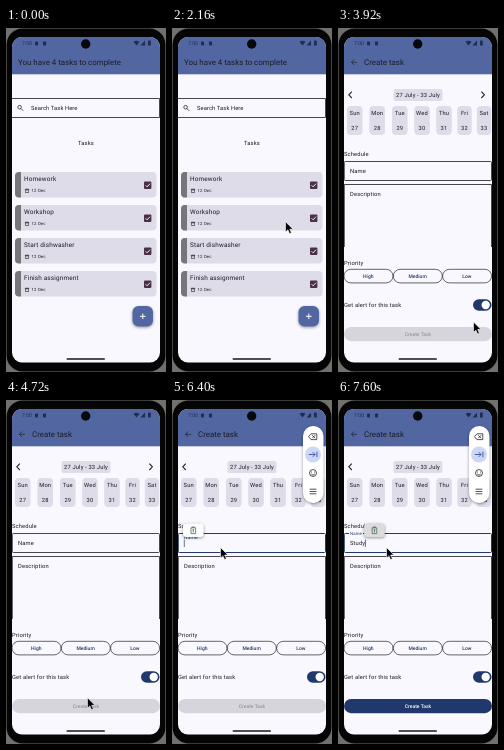
An HTML page that plays this animation: 160x344 px, repeating every 8 s.

```html
<!DOCTYPE html>
<html lang="en">
<head>
<meta charset="utf-8">
<title>Task planner</title>
<style>
  html, body { margin: 0; width: 100%; height: 100%; overflow: hidden; background: #70706c; }
  svg { display: block; width: 160px; height: 344px; }
  text { font-family: Roboto, Arial, sans-serif; fill: #1c1b20; text-rendering: geometricPrecision; }
  .line { fill: none; stroke: #1c1b20; stroke-width: .8; }
  .icon { fill: none; stroke: #26262c; stroke-width: .8; }
  .shadow { filter: drop-shadow(0 1px 1.5px #0006); }
</style>
</head>
<body>
<svg id="stage" viewBox="0 0 160 344"></svg>
<script>
const NAVY = '#20386c', BLUE = '#5267a2', CHIP = '#dddce8';

const text = (x, y, s, size = 5.75, attrs = '') =>
  `<text x="${x}" y="${y}" font-size="${size}" ${attrs}>${s}</text>`;
const mid = 'text-anchor="middle" ';
const spaced = 'letter-spacing=".16"';
const rect = (x, y, w, h, r, fill, attrs = '') =>
  `<rect x="${x}" y="${y}" width="${w}" height="${h}" rx="${r}" fill="${fill}" ${attrs}/>`;
const path = (d, attrs = 'class="icon"') => `<path d="${d}" ${attrs}/>`;

const statusBar = text(16, 17.3, '7:00', 5.2, 'style="fill:#222b50"') +
  rect(29, 13.5, 3, 4, 1, '#222b50') + rect(37, 13.5, 3, 4, .8, '#222b50') +
  path('M127.5 13.8Q130.5 11.6 133.5 13.8L130.5 17.6ZM139 12.5V17.5H134.5Z', 'fill="#222b50"') +
  rect(142, 12.5, 2.8, 5, .6, '#222b50') +
  '<circle cx="79.7" cy="16" r="4.7" fill="#07080b"/>';

const card = (title, i) => {
  const y = 144 + i * 33;
  return `<g transform="translate(0 ${y})">` +
    rect(9, 0, 141.5, 25.5, 4, CHIP) +
    path('M15 0H13A4 4 0 0 0 9 4V21.5A4 4 0 0 0 13 25.5H15Z', 'fill="#77757a"') +
    text(18, 9.4, title, 6.4, spaced) +
    rect(19, 16.7, 4, 4, .5, '#4a4950') + rect(19.7, 18.3, 2.6, 1.7, 0, CHIP) +
    text(25.5, 20.3, '12 Dec', 4.3, spaced) +
    rect(138, 9.5, 7.4, 7.4, 1, '#4b3144') +
    path('M139.6 13.3L141.1 14.8L144 11.7', 'fill="none" stroke="#fff" stroke-width=".9"') + '</g>';
};

const listHead = text(12, 37.2, 'You have 4 tasks to complete', 7.9);
const list =
  path('M6 70.5H153.5V89.5H6', 'class="line"') +
  '<circle cx="13.6" cy="79.2" r="1.8" class="icon"/>' + path('M15 80.6L17.2 82.8') +
  text(25, 82, 'Search Task Here', 5.75, 'letter-spacing=".12"') +
  text(80, 117.3, 'Tasks', 5.75, mid + spaced) +
  ['Homework', 'Workshop', 'Start dishwasher', 'Finish assignment'].map(card).join('') +
  rect(126.5, 278, 20.5, 20.5, 6, BLUE, 'class="shadow"') +
  path('M134 288.3H139.6M136.8 285.5V291.1', 'stroke="#fff" stroke-width="1"');

const formHead = path('M19 34.3H13.4M16.2 31.5L13.4 34.3L16.2 37.1') +
  text(26, 37.1, 'Create task', 7.9);
const days = ['Sun', 'Mon', 'Tue', 'Wed', 'Thu', 'Fri', 'Sat'];
const centers = [16.7, 39.2, 61.8, 84, 106, 126.5, 146];
const dayChip = (x, i) => {
  const w = i < 5 ? 15.6 : 14.4;
  return rect(x - w / 2, 78, w, 29, 4, CHIP) +
    text(x, 87.3, days[i], 5.75, mid + spaced) + text(x, 101.9, 27 + i, 5.75, mid + spaced);
};
const segment = (label, i) =>
  rect(6 + i * 49.3, 241.3, 49, 13.6, 6.8, 'none', 'stroke="#24252b" stroke-width=".7"') +
  text(30.3 + i * 49.3, 250, label, 5, mid + `font-weight="500" style="fill:${NAVY}"`);

const form =
  path('M13.8 63.6L10.8 66.8L13.8 70M143.4 63.6L146.4 66.8L143.4 70', 'class="icon" style="stroke-width:1.1"') +
  rect(55.5, 61, 49, 12, 2, CHIP) + text(80, 69, '27 July - 33 July', 5.75, mid + spaced) +
  centers.map(dayChip).join('') +
  text(6, 128.2, 'Schedule', 5.75, spaced) +
  '<rect id="nameBox" x="6.3" y="133.5" width="147.2" height="19" rx="1" class="line"/>' +
  '<rect id="gap" x="11" y="132" width="14" height="3" fill="#faf8ff"/>' +
  '<text id="label" x="12" letter-spacing=".14">Name</text>' +
  '<text id="typed" x="12" y="145" font-size="5.75" letter-spacing=".14"></text>' +
  `<path id="caret" d="M0 139.5V147" stroke="${NAVY}" stroke-width=".7"/>` +
  path('M6.3 219V156.5H153.5V219', 'class="line"') +
  text(12, 168, 'Description', 5.75, spaced) +
  text(6, 237.2, 'Priority', 5.75, spaced) +
  ['High', 'Medium', 'Low'].map(segment).join('') +
  text(6, 279, 'Get alert for this task', 5.75, spaced) +
  rect(135, 271.2, 18.5, 11.6, 5.8, NAVY) + '<circle cx="147.7" cy="277" r="4.2" fill="#fff"/>' +
  '<rect id="button" x="6" y="299" width="148" height="14.2" rx="7.1"/>' +
  text(80, 308, 'Create Task', 5, mid + 'id="buttonText" font-weight="500"');

const toolbar = rect(131, 26, 20.5, 77, 10, '#fff', 'class="shadow"') +
  '<circle cx="141" cy="54.5" r="8" fill="#ccd6f6"/>' +
  path('M139 33.8H144.8V39.6H139L136.5 36.7ZM140.2 35.2L143.2 38.2M143.2 35.2L140.2 38.2') +
  path('M136.8 54.5H143M140.8 52.2L143 54.5L140.8 56.8M144.9 51.8V57.2', 'fill="none" stroke="#3b51a0" stroke-width=".9"') +
  '<circle cx="141" cy="73" r="3.5" class="icon"/>' +
  path('M139.5 71.6V72.5M142.5 71.6V72.5M139.2 74Q141 76.4 142.8 74') +
  path('M137.6 89.2H144.4M137.6 91.5H144.4M137.6 93.8H144.4');

const pasteChip = '<rect id="chip" x="-10.3" y="123.5" width="20.6" height="13.6" rx="3" class="shadow"/>' +
  path('M-2.3 127.8H2.3V133.6H-2.3ZM-1 127.8V126.9H1V127.8M-.8 129.7H.8M0 129.7V132.4',
    'fill="none" stroke="#40584d" stroke-width=".7"');

const stage = document.getElementById('stage');
stage.innerHTML =
  rect(.6, .6, 158.8, 342.8, 16, '#050506') +
  '<clipPath id="screen"><rect x="6" y="9" width="148" height="325.5" rx="10"/></clipPath>' +
  '<g clip-path="url(#screen)">' + rect(6, 9, 148, 326, 0, '#faf8ff') + rect(6, 9, 148, 37.3, 0, BLUE) +
  `<g id="listHead">${listHead}</g><g id="formHead">${formHead}</g>` +
  `<g id="list">${list}</g><g id="form">${form}</g>${statusBar}` +
  rect(60.5, 330.2, 38.5, 1.5, .75, '#17171a') + '</g>' +
  `<g id="toolbar">${toolbar}</g><g id="paste">${pasteChip}</g>` +
  path('M0 0V10.4L2.4 8.2L4.1 12L5.9 11.2L4.2 7.5H7.5Z', 'id="pointer" fill="#000" stroke="#fff" stroke-width=".6"');

const el = {};
for (const node of stage.querySelectorAll('[id]')) el[node.id] = node;
const show = (node, on) => node.setAttribute('visibility', on ? 'visible' : 'hidden');
const clamp = v => Math.max(0, Math.min(1, v));
const smooth = v => v * v * (3 - 2 * v);

// Pointer stops: time, x, y
const stops = [
  [2160, 113.5, 193.5], [2800, 135.5, 294], [4400, 135.5, 294], [4560, 112, 303],
  [4720, 81.5, 298], [5200, 60, 200], [5600, 57.5, 180], [6160, 48.5, 147.5], [8000, 48.5, 147.5]
];
function pointerAt(t) {
  const i = Math.max(1, stops.findIndex(s => s[0] > t));
  const [t0, x0, y0] = stops[i - 1], [t1, x1, y1] = stops[i];
  const k = clamp((t - t0) / (t1 - t0));
  return [x0 + (x1 - x0) * k, y0 + (y1 - y0) * k];
}

const OPEN = 3240, FOCUS = 6320, TYPE = 7040, KEY = 120;

function draw(t) {
  const fade = smooth(clamp((t - OPEN) / 450));
  el.list.setAttribute('opacity', 1 - fade);
  el.form.setAttribute('opacity', fade);
  show(el.listHead, t < OPEN);
  show(el.formHead, t >= OPEN);

  const focused = t >= FOCUS, lift = smooth(clamp((t - FOCUS) / 150));
  el.nameBox.style.stroke = focused ? NAVY : '';
  el.nameBox.style.strokeWidth = focused ? 1 : '';
  show(el.gap, lift > .5);
  el.label.setAttribute('y', 145 - 10.3 * lift);
  el.label.setAttribute('font-size', 5.75 - 1.45 * lift);
  el.label.style.fill = focused ? NAVY : '';

  const count = t < TYPE ? 0 : Math.min(5, 1 + Math.floor((t - TYPE) / KEY));
  el.typed.textContent = 'Study'.slice(0, count);
  const end = 12 + (count ? el.typed.getComputedTextLength() : 0);
  el.caret.setAttribute('transform', `translate(${end + .3} 0)`);
  show(el.caret, focused && (count || (t - FOCUS) % 1000 < 500));

  el.button.setAttribute('fill', count ? NAVY : '#d6d4dc');
  el.buttonText.style.fill = count ? '#fff' : '#96949d';
  show(el.toolbar, focused);
  show(el.paste, focused);
  el.paste.setAttribute('transform', `translate(${end + 9.3} 0)`);
  el.chip.setAttribute('fill', count ? '#dadcde' : '#fcfdfd');

  show(el.pointer, t >= 2160);
  el.pointer.setAttribute('transform', `translate(${pointerAt(t)})`);
}

const start = performance.now();
function tick() {
  draw((performance.now() - start) % 8000);
  requestAnimationFrame(tick);
}
tick();
</script>
</body>
</html>
```
